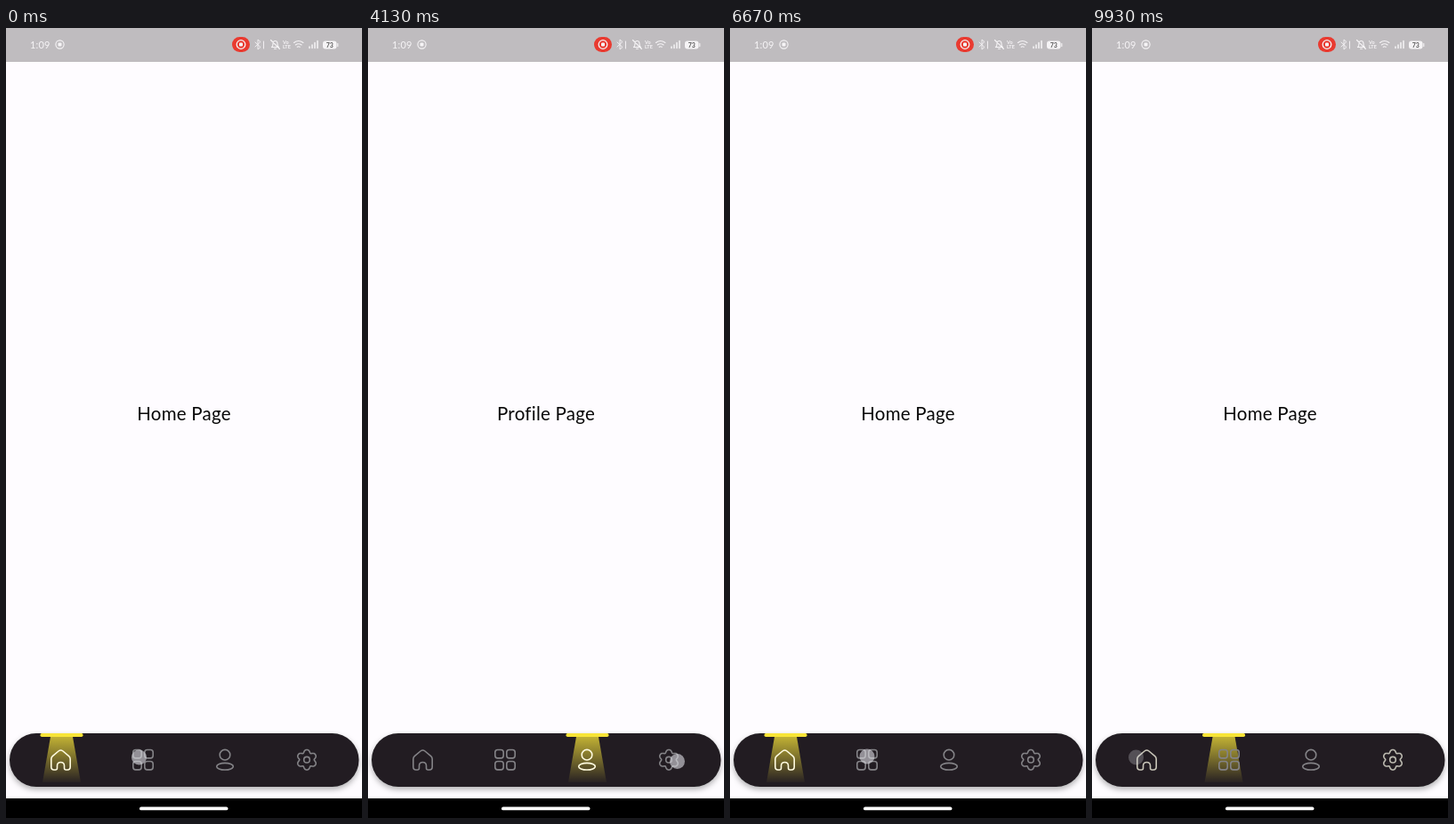
Animation of 400x886 px, one loop 10 s. Source, as an HTML page:

```html
<!DOCTYPE html>
<html lang="en">
<head>
<meta charset="utf-8">
<title>Spotlight navigation bar</title>
<style>
  html, body { margin: 0; width: 100%; height: 100%; overflow: hidden; background: #fefcff; }
  svg { display: block; width: 400px; height: 886px; }
  text { font-family: Lato, "Open Sans", sans-serif; }
  #icons { fill: none; stroke-width: 1.6; stroke-linecap: round; stroke-linejoin: round; }
  #status { fill: none; stroke: #f6f4f6; stroke-width: 1.1; stroke-linecap: round; stroke-linejoin: round; }
  .solid { fill: #f6f4f6; stroke: none; }
</style>
</head>
<body>
<svg viewBox="0 0 400 886">
  <defs>
    <linearGradient id="glow" x1="0" y1="0" x2="0" y2="1">
      <stop offset="0" stop-color="#ffeb3b" stop-opacity=".72"/>
      <stop offset="1" stop-color="#ffeb3b" stop-opacity=".03"/>
    </linearGradient>
    <filter id="shadow" x="-10%" y="-30%" width="120%" height="170%">
      <feDropShadow dx="0" dy="3" stdDeviation="3" flood-color="#000" flood-opacity=".3"/>
    </filter>
  </defs>

  <rect width="400" height="886" fill="#fefcff"/>
  <rect width="400" height="38" fill="#bfbcbf"/>

  <g id="status">
    <text class="solid" x="27" y="22.5" font-size="11" letter-spacing=".2">1:09</text>
    <circle cx="60.500" cy="18.500" r="4.600"/>
    <rect class="solid" x="58.500" y="16.500" width="4" height="4" rx="1"/>
    <rect x="254" y="10" width="20" height="17" rx="8.500" fill="#e93a30" stroke="none"/>
    <circle cx="264" cy="18.500" r="4.800" stroke-width="1.300"/>
    <rect class="solid" x="262" y="16.500" width="4" height="4" rx="1"/>
    <path d="M280 16l6 5.500-3 2.500V13l3 2.500-6 5.500M289.500 15v8" stroke-width=".9"/>
    <path d="M298.500 21.500q1.500-1 1.500-4 0-3 2.500-3t2.500 3q0 3 1.500 4zM301.500 23.300h2M297.500 13.500l10 10"/>
    <text class="solid" x="311" y="18" font-size="5.500" font-weight="700">Vo</text>
    <text class="solid" x="311" y="23.300" font-size="5.500" font-weight="700">LTE</text>
    <path d="M323.500 16.500q5-4 10.500 0M325.300 19q3.300-2.600 6.800 0M327.200 21.300q1.500-1 3 0"/>
    <path d="M341 22.500v-1.500M344 22.500v-3.500M347 22.500v-6M350 22.500v-8" stroke-width="1.500"/>
    <rect class="solid" x="356" y="14.500" width="15.500" height="9" rx="3"/>
    <path d="M372.800 17.500v3"/>
    <text x="363.800" y="21.600" font-size="7" font-weight="700" text-anchor="middle" fill="#555" stroke="none">73</text>
  </g>

  <text id="page" x="200" y="440" font-size="20.500" letter-spacing=".25" text-anchor="middle" fill="#080808"></text>

  <rect x="4" y="791" width="392.500" height="60" rx="30" fill="#211f22" filter="url(#shadow)"/>
  <g id="lamp">
    <path d="M-12.500 795H12.500L21.500 846H-21.500Z" fill="url(#glow)"/>
    <rect x="-24" y="791" width="48" height="4" rx="1.800" fill="#f7e437"/>
  </g>
  <g id="icons">
    <path transform="translate(61.500 821)" d="M-4 9V6.500Q-4 2.500 0 2.500T4 6.500V9Q4 11 6 11H7.500Q10.700 11 10.700 7.500V-1Q10.700-3 9.200-4.300L2.500-10Q0-12-2.500-10L-9.200-4.300Q-10.700-3-10.700-1V7.500Q-10.700 11-7.500 11H-6Q-4 11-4 9Z"/>
    <g transform="translate(154 820.700)">
      <rect x="-11.200" y="-11.200" width="9.400" height="9.400" rx="2.800"/>
      <rect x="1.800" y="-11.200" width="9.400" height="9.400" rx="2.800"/>
      <rect x="-11.200" y="1.800" width="9.400" height="9.400" rx="2.800"/>
      <rect x="1.800" y="1.800" width="9.400" height="9.400" rx="2.800"/>
    </g>
    <g transform="translate(246 820.700)">
      <circle cy="-5.500" r="5.800"/>
      <rect x="-9.300" y="3.700" width="18.600" height="7.600" rx="9.300" ry="3.800"/>
    </g>
    <g transform="translate(338 820.700)">
      <path id="gear"/>
      <circle r="3.300"/>
    </g>
  </g>
  <g id="touches" fill="#d8d8de"></g>

  <rect y="864" width="400" height="22" fill="#000"/>
  <rect x="150" y="873.500" width="99.500" height="3.800" rx="1.900" fill="#fff"/>
</svg>
<script>
const LOOP = 10000, SLIDE = 400, FADE = 500;
const pages = ["Home Page", "Category Page", "Profile Page", "Settings Page"];
const lampX = [62.5, 153, 246.5, 338.5];
const grey = [132, 131, 135], lit = [255, 251, 224];

// press time, release time, chosen tab, finger position
const taps = [
  [0, 2040, 1, 149.5, 818],
  [3000, 3310, 2, 246, 818],
  [4080, 4300, 3, 347.5, 822.5],
  [5330, 5970, 0, 61, 818],
  [6620, 7250, 1, 154, 817],
  [7980, 8205, 2, 246, 817],
  [8650, 8920, 3, 340, 820],
  [9520, 9655, 0, 49.5, 818]
];

const $ = id => document.getElementById(id);
const clamp = v => Math.max(0, Math.min(1, v));
const mix = (a, b, k) => a + (b - a) * k;

const gearPoints = Array.from({ length: 120 }, (_, i) => {
  const a = i * Math.PI / 60;
  const r = 10 + 1.5 * Math.cos(6 * a) - 0.25 * Math.cos(12 * a);
  return (r * Math.sin(a)).toFixed(2) + " " + (-r * Math.cos(a)).toFixed(2);
});
$("gear").setAttribute("d", "M" + gearPoints.join("L") + "Z");

const icons = [...$("icons").children];
const dots = taps.map(([, , , x, y]) => {
  const dot = document.createElementNS("http://www.w3.org/2000/svg", "circle");
  dot.setAttribute("cx", x);
  dot.setAttribute("cy", y);
  dot.setAttribute("r", 8.5);
  return $("touches").appendChild(dot);
});

function draw(t) {
  let from = 0, to = 0, start = -LOOP;
  taps.forEach(([press, release, tab], i) => {
    if (t >= release) {
      from = to;
      to = tab;
      start = release;
    }
    const strength = t < press ? 0 : 1 - clamp((t - release) / FADE);
    dots[i].setAttribute("opacity", 0.62 * strength);
  });

  const x = mix(lampX[from], lampX[to], clamp((t - start) / SLIDE));
  $("lamp").setAttribute("transform", `translate(${x} 0)`);
  $("page").textContent = pages[to];

  const k = clamp((t - start) / FADE);
  icons.forEach((icon, i) => {
    const w = i === to ? k : i === from ? 1 - k : 0;
    icon.setAttribute("stroke", `rgb(${grey.map((c, n) => mix(c, lit[n], w))})`);
  });
}

const began = performance.now();
function tick() {
  draw((performance.now() - began) % LOOP);
  requestAnimationFrame(tick);
}
tick();
</script>
</body>
</html>
```
